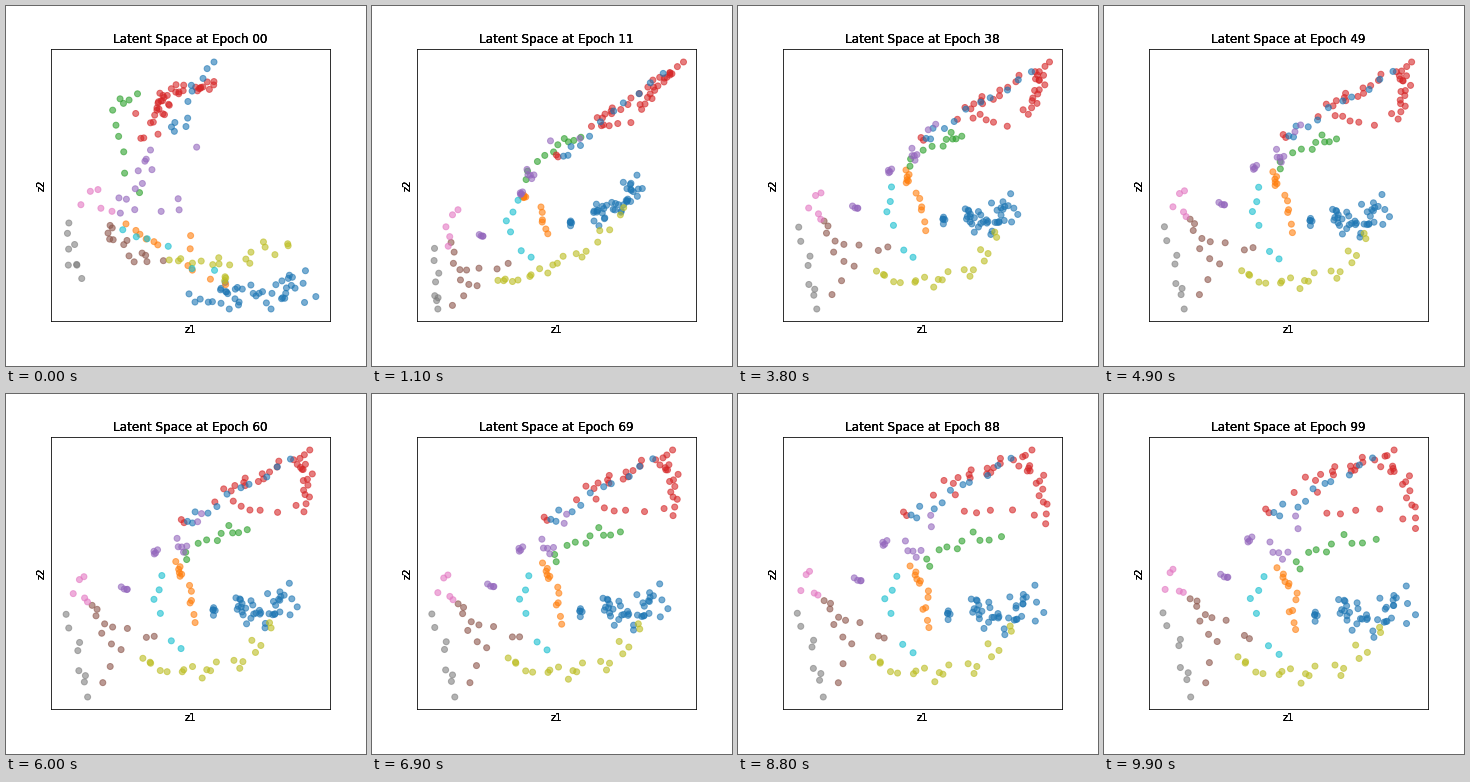
These frames come from a looping animation (360 px wide and 360 px high, 10 s). A matplotlib script:

```python
import numpy as np
import matplotlib.pyplot as plt
from matplotlib.animation import FuncAnimation

EPOCHS = 100
KEYS = [0, 11, 38, 99]
SCATTER = [1.0, 0.6, 0.85, 1.15]  # how loose the strands are at each key

plt.rcParams.update({"font.family": "DejaVu Sans", "font.size": 10})
rng = np.random.default_rng(7)
tracks, colors = [], []


def strand(color, n, spread, *lines):
    """n points along a line of anchors (x, y, x, y, ...) for each key epoch."""
    noise = rng.normal(size=(n, 2)).clip(-1.7, 1.7) * spread
    u = np.linspace(0, 1, n)
    poses = []
    for line, loose in zip(lines, SCATTER):
        xs, ys = line[::2], line[1::2]
        knots = np.linspace(0, 1, len(xs))
        on_line = np.column_stack([np.interp(u, knots, xs), np.interp(u, knots, ys)])
        poses.append(np.clip(on_line + noise * loose, (58, 56), (311.5, 303)))
    tracks.append(np.stack(poses))
    colors.extend([f"tab:{color}"] * n)


# main cluster and its small left neighbour
strand("blue", 38, 11, (215, 294, 262, 287, 296, 283), (222, 213, 250, 200, 262, 178),
       (232, 213, 255, 217, 268, 202), (243, 218, 270, 226, 297, 212))
strand("blue", 5, 3, (184, 289, 207, 299), (199, 217), (206, 214), (212, 222))

strand("orange", 6, 2.5, (120, 219, 155, 238), (152, 190), (168, 165, 171, 176),
       (173, 175, 188, 191))
strand("orange", 6, 2, (188, 233, 180, 262, 220, 279), (171, 203, 170, 214, 176, 228),
       (181, 190, 184, 200, 188, 225), (197, 203, 186, 215, 192, 236))

strand("green", 10, 5, (130, 184, 102, 110, 140, 84), (152, 172, 182, 142, 214, 129),
       (169, 158, 205, 137, 231, 127), (192, 172, 220, 155, 282, 141))

# outer rim, inner points, and the stray pair
strand("red", 33, 5, (142, 128, 157, 100, 163, 86, 190, 85, 205, 75),
       (222, 118, 245, 104, 309, 60, 285, 80, 268, 101),
       (223, 110, 250, 94, 309, 60, 300, 84, 288, 105),
       (195, 94, 240, 78, 282, 62, 300, 88, 309, 130))
strand("red", 4, 3, (150, 93, 157, 106), (228, 118, 258, 115), (240, 106, 268, 118),
       (220, 116, 274, 112))
strand("red", 2, 1, (128, 106, 136, 134), (185, 150), (184, 133), (163, 117))

# blue points among the red ones
strand("blue", 11, 3, (163, 124, 181, 120, 188, 80, 211, 58),
       (190, 152, 210, 138, 250, 99, 293, 69), (186, 135, 208, 121, 252, 93, 296, 68),
       (167, 122, 196, 112, 228, 88, 272, 67))

strand("purple", 4, 2.5, (144, 146, 130, 165), (148, 188), (150, 166), (143, 147))
strand("purple", 5, 3, (146, 168, 113, 197), (155, 166, 162, 172),
       (174, 146, 179, 153), (166, 153, 184, 164))
strand("purple", 2, 0.5, (191, 142, 173, 193), (208, 133, 179, 135),
       (198, 119, 191, 124), (192, 123, 195, 135))
strand("purple", 4, 2.5, (111, 207, 173, 204), (109, 230), (117, 202), (120, 183))

strand("brown", 8, 3, (104, 217, 106, 232, 141, 247), (79, 235, 84, 260, 102, 266, 137, 256),
       (86, 213, 92, 228, 116, 243, 151, 239), (86, 202, 98, 212, 118, 229, 147, 242))
strand("brown", 5, 2, (117, 242, 128, 258, 155, 254), (88, 276, 105, 281, 79, 299),
       (95, 249, 116, 262, 92, 288), (95, 231, 113, 250, 99, 288))

strand("pink", 5, 3, (92, 179, 80, 194, 104, 205), (86, 201, 77, 218, 75, 240),
       (83, 183, 75, 198, 81, 213), (69, 170, 67, 190, 77, 198))

strand("gray", 8, 4, (62, 218, 63, 250, 76, 269), (62, 243, 64, 283, 66, 303),
       (60, 222, 72, 268, 79, 303), (58, 220, 78, 260, 87, 303))

strand("olive", 20, 4.5, (165, 255, 205, 252, 222, 274, 245, 242, 286, 242),
       (127, 275, 152, 272, 185, 258, 215, 243, 254, 203),
       (140, 266, 170, 276, 205, 274, 236, 261, 260, 228),
       (136, 264, 168, 279, 207, 281, 240, 271, 280, 236))

strand("cyan", 6, 6, (115, 225, 150, 235, 205, 264), (145, 195, 133, 220, 157, 251),
       (152, 182, 150, 212, 172, 251), (158, 184, 146, 210, 171, 260))

path = np.concatenate(tracks, axis=1)

fig = plt.figure(figsize=(5, 5), dpi=72, facecolor="white")
ax = fig.add_axes([0.125, 0.125, 0.775, 0.755])
ax.set(xticks=[], yticks=[], xlim=(45, 324), ylim=(315, 43.2))
dots = ax.scatter(*path[0].T, c=colors, alpha=0.6)


def label(text, at, shift, **style):
    # stacked copies give the heavy edges
    return [ax.annotate(text, at, shift, xycoords="axes fraction",
                        textcoords="offset points", ha="center", **style)
            for _ in range(3)]


titles = label("", (0.5, 1), (0, 6), va="baseline", fontsize=12)
label("z1", (0.5, 0), (0, -4), va="top")
label("z2", (0, 0.5), (-4, 0), va="bottom", rotation=90, rotation_mode="anchor")


def place(epoch):
    i = min(np.searchsorted(KEYS, epoch, side="right"), len(KEYS) - 1) - 1
    t = (epoch - KEYS[i]) / (KEYS[i + 1] - KEYS[i])
    if i == 0:
        t = 1 - (1 - t) ** 2  # early training moves fastest
    return path[i] + (path[i + 1] - path[i]) * t


def draw(epoch):
    dots.set_offsets(place(epoch))
    for title in titles:
        title.set_text(f"Latent Space at Epoch {epoch:02d}")
    return dots, *titles


anim = FuncAnimation(fig, draw, frames=EPOCHS, interval=100, repeat=True,
                     repeat_delay=0)
plt.show()
```
